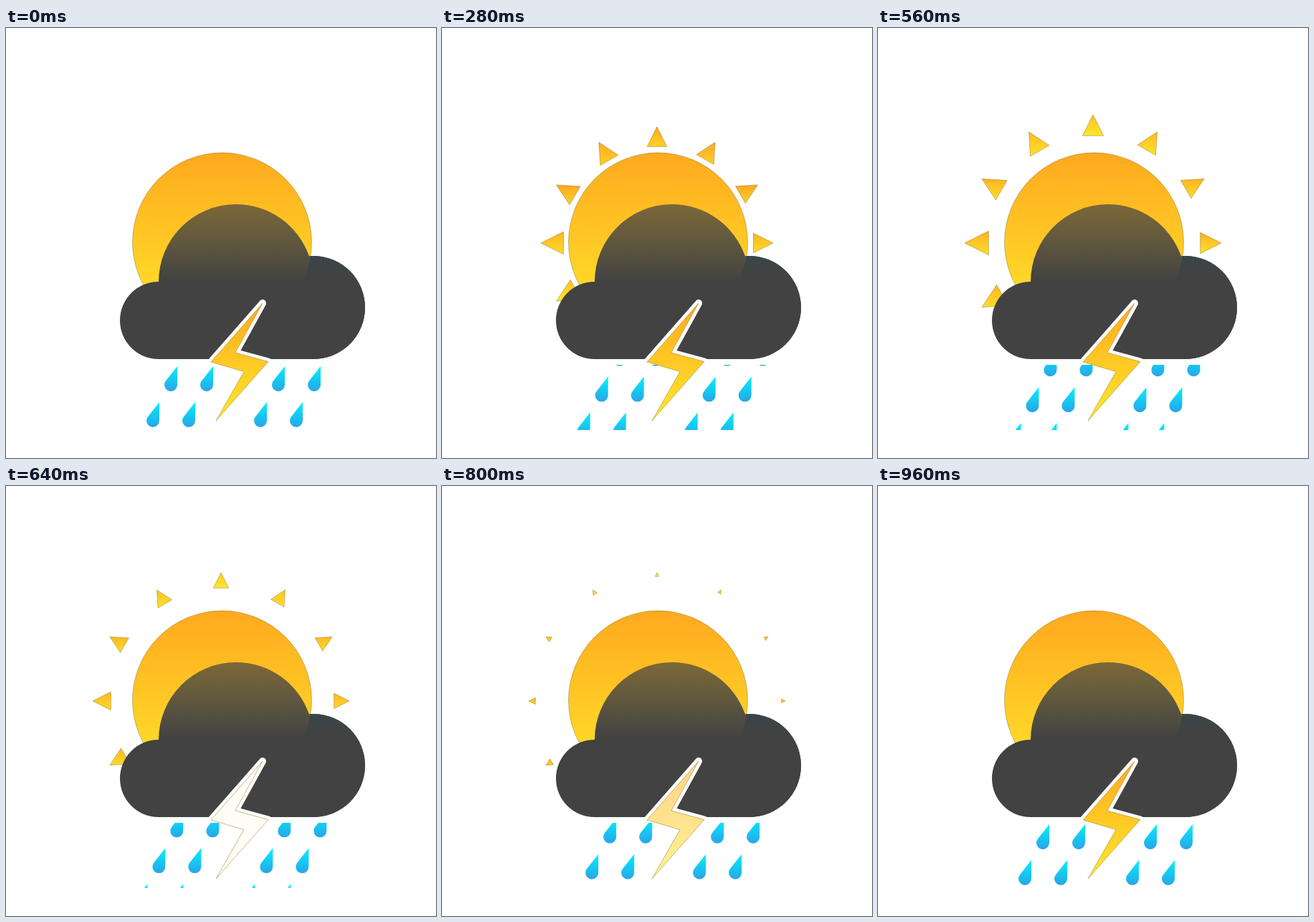
Animation of 600x600 px, one loop 1000 ms. Source, as an HTML page with a canvas:

```html
<!DOCTYPE html>
<html lang="en">
<head>
<meta charset="utf-8">
<title>Thunderstorm</title>
<style>
  html, body { margin: 0; width: 100%; height: 100%; overflow: hidden; background: #fff; }
  canvas { display: block; width: 600px; height: 600px; }
</style>
</head>
<body>
<canvas id="stage" width="600" height="600"></canvas>
<script>
const ctx = document.getElementById('stage').getContext('2d');
const TAU = Math.PI * 2;
const STEP = 40, STEPS = 25, CYCLE = 24;
const ORANGE = '#ffa91f', YELLOW = '#ffe82b', DARK = '#424242';

const clamp = v => Math.max(0, Math.min(1, v));

function disc(x, y, r) {
  const p = new Path2D();
  p.arc(x, y, r, 0, TAU);
  return p;
}

function polygon(points) {
  const p = new Path2D();
  points.forEach(([x, y]) => p.lineTo(x, y));
  p.closePath();
  return p;
}

function vertical(y0, y1, ...stops) {
  const g = ctx.createLinearGradient(0, y0, 0, y1);
  stops.forEach((c, i) => g.addColorStop(i / (stops.length - 1), c));
  return g;
}

function fill(path, style) {
  ctx.fillStyle = style;
  ctx.fill(path);
}

function hairline(path) {
  ctx.strokeStyle = 'rgba(90, 78, 15, 0.5)';
  ctx.lineWidth = 0.7;
  ctx.lineJoin = 'miter';
  ctx.stroke(path);
}

const sun = disc(301.5, 299, 125);
const lobe = disc(429, 390, 72);

const cloud = new Path2D();
cloud.moveTo(213, 462);
cloud.arc(213, 408, 54, TAU / 4, TAU * 3 / 4);
cloud.arc(321, 354, 108, Math.PI, Math.atan2(-36, 102));
cloud.arc(429, 390, 72, Math.atan2(-72, -6), TAU / 4);
cloud.closePath();

const outsideSun = new Path2D();
outsideSun.rect(0, 0, 600, 600);
outsideSun.addPath(sun);

const bolt = polygon([[358, 384], [286, 466], [332, 479.5], [293, 548], [366, 465.5], [320, 453]]);

// Tip at the origin, round end below and to the left
const drop = new Path2D();
drop.moveTo(0, 0);
drop.lineTo(0, 26);
drop.arc(-9, 26, 9, 0, Math.atan2(-5.57, -7.07));
drop.closePath();

// Angle in degrees from the top, extra length towards the sun
const rays = [[-120, 4], [-90, 4], [-60, 2.3], [-30, 1.2], [0, 0], [30, 0], [60, 0], [90, 0]];

function triangle(deg, base, tip) {
  const a = deg * TAU / 360, s = Math.sin(a), c = Math.cos(a), w = (tip - base) / 2;
  const at = (r, side) => [300 + r * s + side * c, 300 - r * c + side * s];
  return [at(tip, 0), at(base, w), at(base, -w)];
}

function drawRay(deg, extra, n) {
  const inner = 134.5 - extra, full = 179 - inner;
  const tip = Math.min(179, 124.7 + 5.35 * n);
  const base = inner + Math.max(0, 4 * (n - 10.2));
  if (tip <= base) return;
  const whole = tip < 179 ? triangle(deg, tip - full, tip) : triangle(deg, base, base + full);
  const ys = whole.map(p => p[1]);
  const path = polygon(triangle(deg, base, tip));
  fill(path, vertical(Math.min(...ys), Math.max(...ys), ORANGE, YELLOW));
  hairline(path);
}

function drawCloud() {
  fill(cloud, vertical(246, 352, 'rgba(66, 66, 66, 0.69)', DARK));
  ctx.save();
  ctx.clip(outsideSun, 'evenodd');
  fill(lobe, vertical(318, 348, '#38454a', '#3f4445', DARK));
  ctx.restore();
}

function drawRim() {
  ctx.save();
  ctx.clip(cloud);
  ctx.strokeStyle = '#fff';
  ctx.lineWidth = 10;
  ctx.lineJoin = 'round';
  ctx.stroke(bolt);
  ctx.restore();
}

function drawRain(n) {
  const shift = n / CYCLE;
  ctx.save();
  ctx.beginPath();
  ctx.rect(121, 470, 358, 91);
  ctx.clip();
  for (let row = -1; row < 2; row++) {
    for (const col of [0, 50, 150, 200]) {
      ctx.save();
      ctx.translate(239 + col - 25 * (row + shift), 472 + 50 * (row + shift));
      fill(drop, vertical(0, 35, '#00f0ff', '#29a5e6'));
      ctx.restore();
    }
  }
  ctx.restore();
}

function drawBolt(n) {
  const flash = n < 15.6 ? clamp((n - 14.4) / 1.2) : clamp((24 - n) / 8.4);
  fill(bolt, vertical(384, 548, ORANGE, YELLOW));
  fill(bolt, `rgba(255, 255, 255, ${flash})`);
  hairline(bolt);
}

function draw(n) {
  ctx.fillStyle = '#fff';
  ctx.fillRect(0, 0, 600, 600);
  rays.forEach(([deg, extra]) => drawRay(deg, extra, n));
  fill(sun, vertical(174, 424, ORANGE, YELLOW));
  hairline(sun);
  drawCloud();
  drawRim();
  drawRain(n);
  drawBolt(n);
}

const start = performance.now();
function tick() {
  draw(Math.floor((performance.now() - start) / STEP) % STEPS);
  requestAnimationFrame(tick);
}
tick();
</script>
</body>
</html>
```
